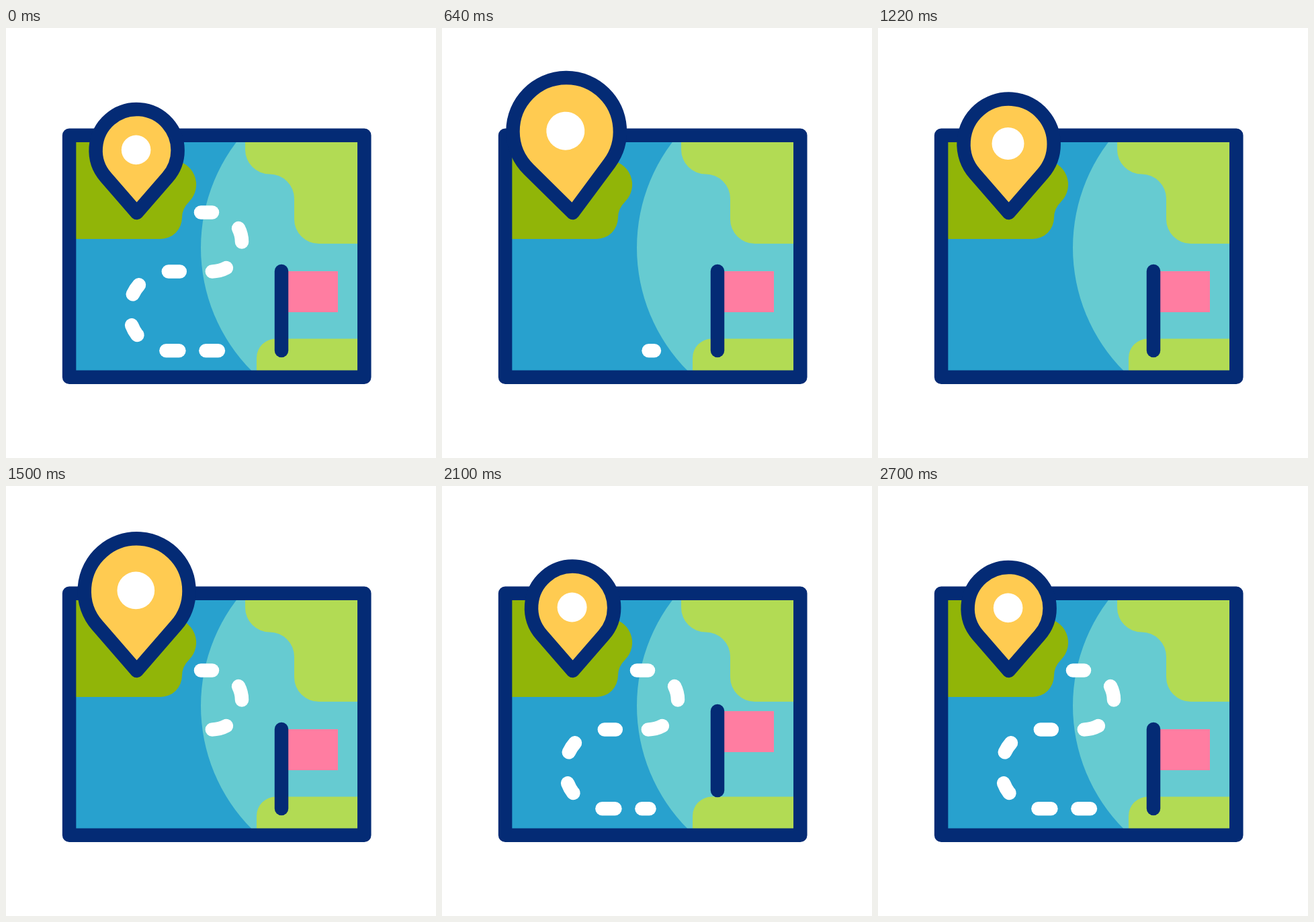
Recreate the animation shown at these times as an HTML page with a canvas. Size 640x640 px, loop 3460 ms.

```html
<!DOCTYPE html>
<html lang="en">
<head>
<meta charset="utf-8">
<title>Map</title>
<style>
  html, body { margin: 0; height: 100%; overflow: hidden; background: #fff; }
  canvas { display: block; }
</style>
</head>
<body>
<canvas width="640" height="640"></canvas>
<script>
const ctx = document.querySelector('canvas').getContext('2d');
const LOOP = 3460, LINE = 20.5, RAD = Math.PI / 180;
const NAVY = '#042b75', LIME = '#b2db54';

// Keyframes: [time, value] pairs with sine easing in between
const SCALE = [[220, 1], [670, 1.31], [1120, 1.078], [1625, 1.31], [2160, 1]];
const TILT = [[220, 0], [610, -4.7], [900, 4.4], [1190, 0]];
const FLAG_Y = [[1840, 0], [2110, -27], [2420, 4], [2700, 0]];

// Start and end of each dash, measured along the route
const DASHES = [[0, 17], [64.9, 86.1], [133.2, 155.2], [203.2, 220.2],
  [269.7, 286.4], [333.7, 350.7], [399.6, 418.6], [458.6, 477.1]];
const ROUTE_LENGTH = 477.1;

const land = new Path2D('M104 170H194V197H247A36 36 0 0 1 272.5 258.5Q262 269 262 282A32 32 0 0 1 230 314H104Z');
const coast = new Path2D('M356 170V181A36.5 36.5 0 0 0 392.5 217.5A36.5 36.5 0 0 1 429 254V284.5A36.5 36.5 0 0 0 465.5 321H523V170Z');
const shore = new Path2D('M373 510V491A28.5 28.5 0 0 1 401.5 462.5H523V510Z');

const route = new Path2D('M290 274.4H307');
route.arc(307, 318.4, 44, -90 * RAD, 90 * RAD);
route.arc(242, 421.3, 58.8, -90 * RAD, -217.2 * RAD, true);
route.lineTo(238, 480.3);
route.lineTo(320, 480.3);

const clamp = v => Math.min(1, Math.max(0, v));
const progress = (t, start, end) => clamp((t - start) / (end - start));
const easeOut = (p, power) => 1 - (1 - p) ** power;

function tween(keys, t) {
  let value = keys[0][1];
  for (let i = 1; i < keys.length; i++) {
    const p = progress(t, keys[i - 1][0], keys[i][0]);
    value += (keys[i][1] - keys[i - 1][1]) * (1 - Math.cos(Math.PI * p)) / 2;
  }
  return value;
}

function fill(color, path) {
  ctx.fillStyle = color;
  ctx.fill(path);
}

function circle(x, y, r) {
  const path = new Path2D();
  path.arc(x, y, r, 0, 2 * Math.PI);
  return path;
}

function drawMap() {
  ctx.save();
  ctx.beginPath();
  ctx.rect(94, 160, 439, 360);
  ctx.clip();
  ctx.fillStyle = '#28a1ce';
  ctx.fillRect(94, 160, 439, 360);
  fill('#66cbd1', circle(550, 327, 260));
  fill('#91b508', land);
  fill(LIME, coast);
  fill(LIME, shore);
  ctx.restore();
  ctx.strokeStyle = NAVY;
  ctx.strokeRect(94.1, 159.8, 439.2, 360);
}

function drawRoute(t) {
  const erasing = t < 1200;
  const front = ROUTE_LENGTH * (erasing
    ? easeOut(progress(t, 220, 705), 2)
    : easeOut(progress(t, 1340, 2354), 3));
  const from = erasing ? front : 0;
  const to = erasing ? ROUTE_LENGTH : front;
  ctx.strokeStyle = '#fff';
  for (const [start, end] of DASHES) {
    const a = Math.max(start, from), b = Math.min(end, to);
    if (b <= a) continue;
    ctx.setLineDash([b - a, 2000]);
    ctx.lineDashOffset = -a;
    ctx.stroke(route);
  }
  ctx.setLineDash([]);
}

function drawFlag(t) {
  const y = tween(FLAG_Y, t);
  ctx.fillStyle = '#ff7da1';
  ctx.fillRect(410, 362 + y, 84, 61);
  ctx.strokeStyle = NAVY;
  ctx.stroke(new Path2D(`M410 ${362 + y}v118`));
}

function drawPin(t) {
  const s = tween(SCALE, t);
  const pin = new Path2D();
  pin.arc(0, -93 * s, 61 * s, 139 * RAD, 401 * RAD);
  pin.lineTo(0, 0);
  pin.closePath();
  ctx.save();
  ctx.translate(194.6, 275);
  ctx.rotate(tween(TILT, t) * RAD);
  fill('#ffcb51', pin);
  ctx.strokeStyle = NAVY;
  ctx.stroke(pin);
  fill('#fff', circle(-s, -93.6 * s, 21.8 * s));
  ctx.restore();
}

function frame(now) {
  const t = now % LOOP;
  ctx.clearRect(0, 0, 640, 640);
  ctx.lineWidth = LINE;
  ctx.lineCap = ctx.lineJoin = 'round';
  drawMap();
  drawRoute(t);
  drawFlag(t);
  drawPin(t);
  requestAnimationFrame(frame);
}
requestAnimationFrame(frame);
</script>
</body>
</html>
```
